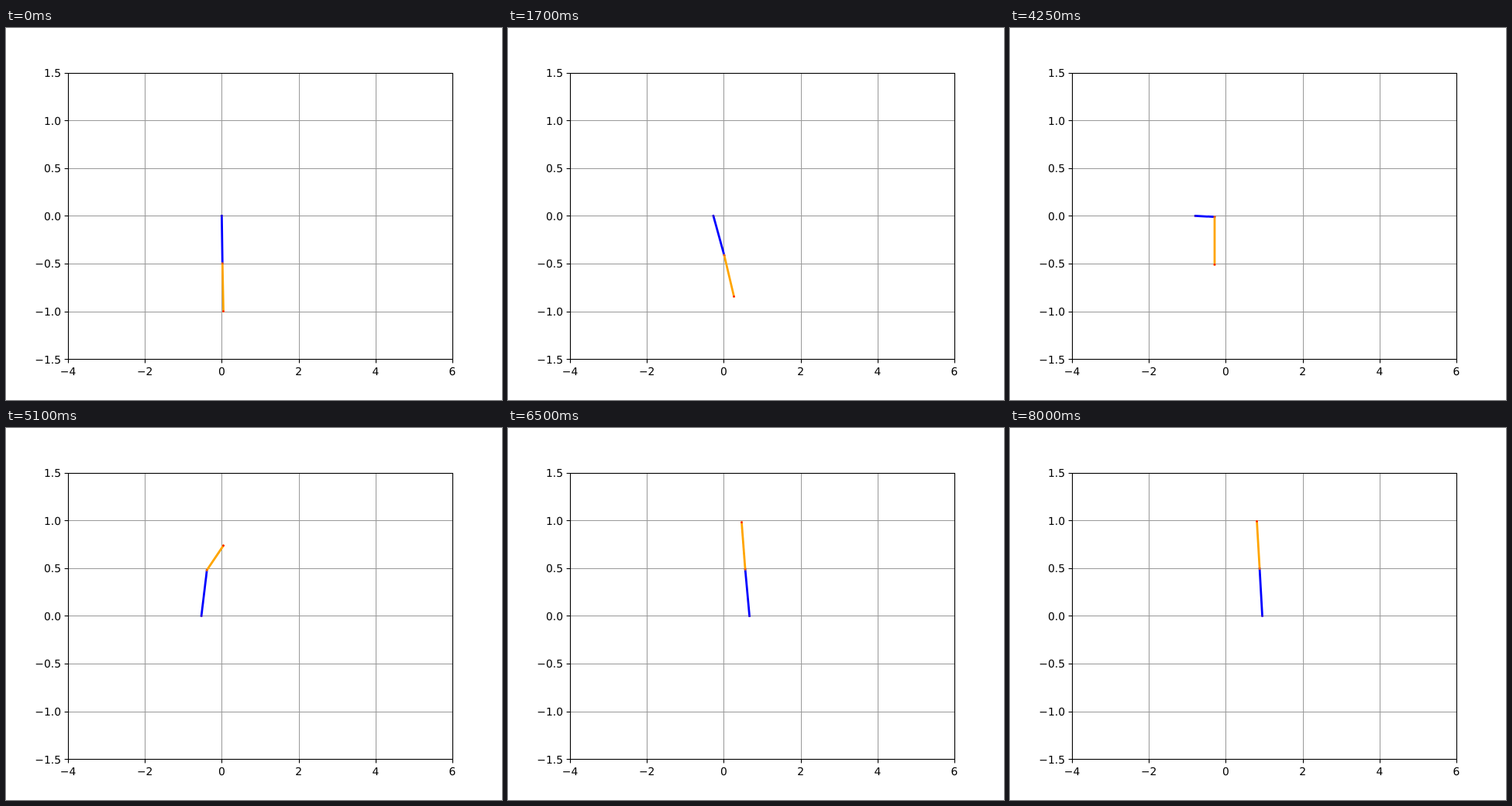
These frames come from a looping animation (640 by 480 pixels, 8.05 s). An HTML page:

```html
<!DOCTYPE html>
<html lang="en">
<head>
<meta charset="utf-8">
<title>Double pendulum swing-up</title>
<style>
  html, body { margin: 0; width: 100%; height: 100%; overflow: hidden; background: #fff; }
  svg { display: block; width: 640px; height: 480px; }
  text { font: 13.89px "DejaVu Sans", sans-serif; text-rendering: geometricPrecision; }
  .grid { stroke: #999; }
  .axis { stroke: #000; stroke-width: 1.11; fill: none; }
  .rod { stroke-width: 2.78; stroke-linecap: square; }
</style>
</head>
<body>
<svg viewBox="0 0 640 480">
  <g id="plot"></g>
  <line id="lower" class="rod" stroke="#00f"/>
  <line id="upper" class="rod" stroke="#ffa500"/>
  <g fill="#f00">
    <circle id="cart" r="1" opacity=".3"/>
    <circle id="joint" r="1.1" opacity=".55"/>
    <circle id="tip" r="1.2"/>
  </g>
</svg>
<script>
const LOOP = 8050, STEP = 50;
const ORIGIN = { x: 278.4, y: 242.4 }, UNIT = { x: 49.6, y: 123.2 };
const ROD = 0.5;
const byId = id => document.getElementById(id);

function setAttrs(el, attrs) {
  for (const name in attrs) el.setAttribute(name, attrs[name]);
}

function add(tag, attrs, content = '') {
  const el = document.createElementNS('http://www.w3.org/2000/svg', tag);
  setAttrs(el, attrs);
  el.textContent = content;
  byId('plot').append(el);
}

const line = (x1, y1, x2, y2, cls) => add('line', { x1, y1, x2, y2, class: cls });
const toX = x => ORIGIN.x + x * UNIT.x;
const toY = y => ORIGIN.y - y * UNIT.y;

function drawPlot() {
  const snap = v => Math.floor(v + 0.5) + 0.5;
  const label = (v, digits) => v.toFixed(digits).replace('-', '\u2212');
  const ticks = (from, to, step, draw) => {
    for (let v = from; v <= to; v += step) draw(v);
  };
  ticks(-4, 6, 2, v => line(snap(toX(v)), 58, snap(toX(v)), 428, 'grid'));
  ticks(-1.5, 1.5, 0.5, v => line(80, snap(toY(v)), 577, snap(toY(v)), 'grid'));
  ticks(-4, 6, 2, v => {
    const x = snap(toX(v));
    line(x, 427.5, x, 432.4, 'axis');
    add('text', { x: toX(v), y: 448, 'text-anchor': 'middle' }, label(v, 0));
  });
  ticks(-1.5, 1.5, 0.5, v => {
    const y = snap(toY(v));
    line(75.6, y, 80.5, y, 'axis');
    add('text', { x: 71, y: Math.round(toY(v) + 5.3), 'text-anchor': 'end' }, label(v, 1));
  });
  add('rect', { x: 80.5, y: 58.5, width: 496, height: 369, class: 'axis' });
}

// Smooth curve through [seconds, value] key points (cubic Hermite).
function curve(...keys) {
  const last = keys.length - 1;
  const slope = i => {
    const a = keys[Math.max(i - 1, 0)], b = keys[Math.min(i + 1, last)];
    return (b[1] - a[1]) / (b[0] - a[0]);
  };
  return t => {
    let i = 0;
    while (i < last - 1 && keys[i + 1][0] <= t) i++;
    const [t0, a] = keys[i], [t1, b] = keys[i + 1];
    const span = t1 - t0, u = (t - t0) / span, v = 1 - u;
    return v * v * (1 + 2 * u) * a + u * u * (3 - 2 * u) * b
      + u * v * span * (v * slope(i) - u * slope(i + 1));
  };
}

// Cart position in axis units; rod angles in radians from hanging straight down.
const cartX = curve([0, 0], [.85, .06], [1.7, -.27], [3.15, -.345], [4.25, -.79],
  [4.6, -.935], [5.1, -.53], [5.85, .275], [7.2, .955], [8, .95]);
const lowerAngle = curve([0, .036], [.85, .04], [1.7, .6], [3.15, -1.13], [4.25, 1.55],
  [5.1, 2.85], [5.85, 3.21], [6.7, 3.39], [7.2, 3.352], [8, 3.28]);
const upperAngle = curve([0, .05], [.85, .06], [1.7, .53], [2.65, 2.1], [3.15, 1.62], [3.4, 1.41],
  [3.85, .08], [4.25, 0], [4.9, 1.75], [5.85, 3.07], [6.7, 3.36], [7.2, 3.342], [8, 3.285]);

const hang = (p, angle) => ({
  x: p.x + ROD * UNIT.x * Math.sin(angle),
  y: p.y + ROD * UNIT.y * Math.cos(angle)
});

function render(t) {
  const cart = { x: toX(cartX(t)), y: ORIGIN.y };
  const joint = hang(cart, lowerAngle(t));
  const tip = hang(joint, upperAngle(t));
  const rod = (id, a, b) => setAttrs(byId(id), { x1: a.x, y1: a.y, x2: b.x, y2: b.y });
  const dot = (id, p) => setAttrs(byId(id), { cx: p.x, cy: p.y });
  rod('lower', cart, joint);
  rod('upper', joint, tip);
  dot('cart', cart);
  dot('joint', joint);
  dot('tip', tip);
}

drawPlot();
const start = performance.now();
function tick() {
  const t = (performance.now() - start) % LOOP;
  render(Math.floor(t / STEP) * STEP / 1000);
  requestAnimationFrame(tick);
}
tick();
</script>
</body>
</html>
```
